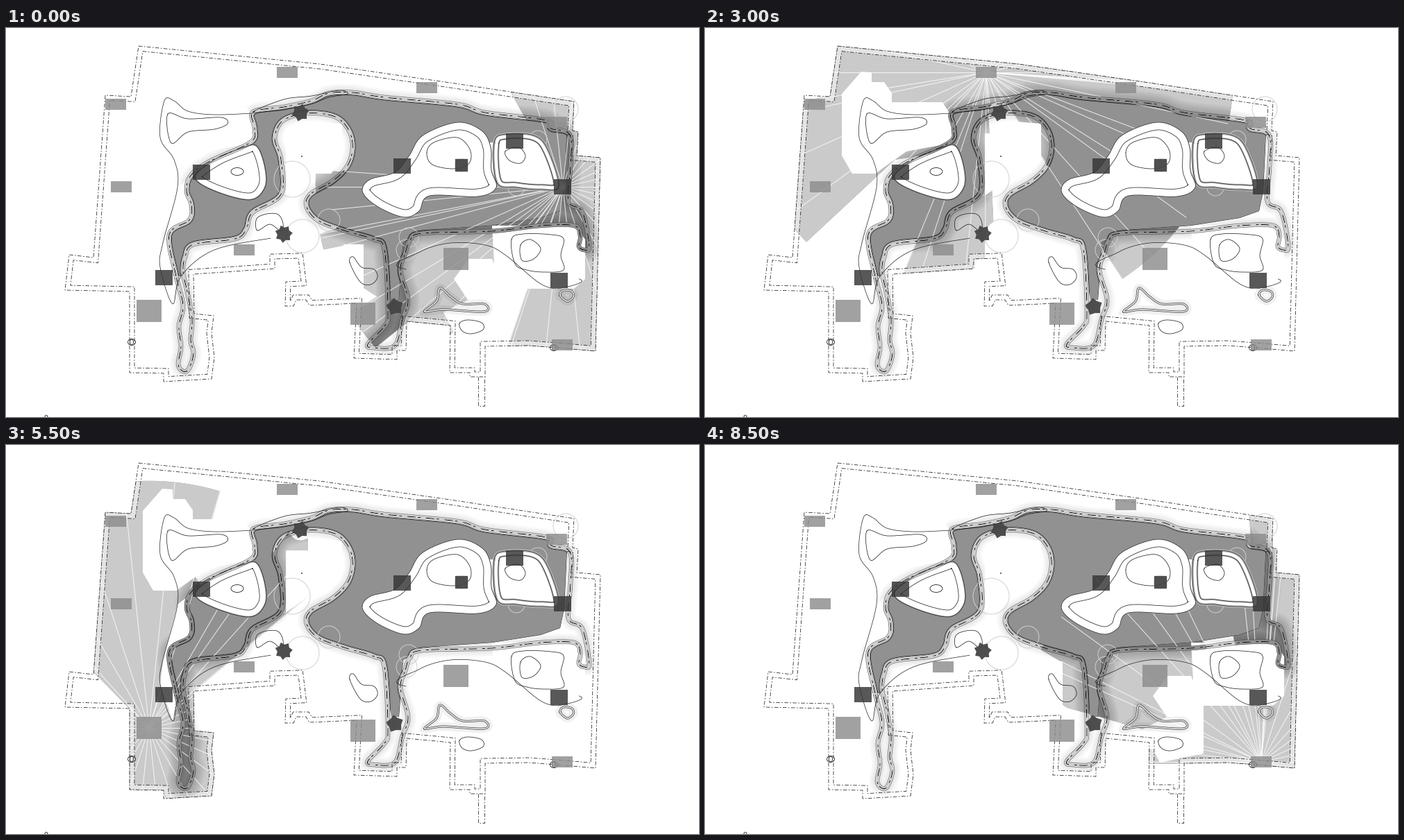
Animation of 998x561 px, one loop 9 s. Source, as a matplotlib script:

```python
import numpy as np
import matplotlib.pyplot as plt
from matplotlib.animation import ArtistAnimation
from matplotlib.collections import LineCollection
from matplotlib.patches import Circle, Ellipse, PathPatch, Polygon, Rectangle
from matplotlib.path import Path

W, H, PX = 998, 561, 0.72
RANGE = 356            # how far a visitor can see
BLACK, GREY = "#222222", "#919191"

fig = plt.figure(figsize=(W / 100, H / 100), dpi=100, facecolor="white")
ax = fig.add_axes([0, 0, 1, 1])
ax.set_xlim(0, W)
ax.set_ylim(H, 0)
ax.axis("off")


def pts(*flat):
    return np.array(flat, float).reshape(-1, 2)


def smooth(*flat, n=8):
    """Closed Catmull-Rom curve through the points."""
    b = pts(*flat)
    a, c, d = (np.roll(b, k, axis=0)[:, None] for k in (1, -1, -2))
    b = b[:, None]
    t = np.linspace(0, 1, n, endpoint=False)[None, :, None]
    curve = 0.5 * (2 * b + (c - a) * t + (2 * a - 5 * b + 4 * c - d) * t**2
                   + (3 * b - a - 3 * c + d) * t**3)
    return curve.reshape(-1, 2)


def inset(p, d):
    """Outline moved inwards by d with mitred corners."""
    nxt = np.roll(p, -1, axis=0)
    e = nxt - p
    e /= np.hypot(*e.T)[:, None]
    area = np.sum(p[:, 0] * nxt[:, 1] - nxt[:, 0] * p[:, 1])
    normal = np.sign(area) * np.c_[-e[:, 1], e[:, 0]]
    before = np.roll(normal, 1, axis=0)
    scale = np.maximum(1 + np.sum(normal * before, axis=1), 0.5)
    return p + d * (normal + before) / scale[:, None]


def ring(x, y, r, n=24):
    a = np.linspace(0, 2 * np.pi, n, endpoint=False)
    return np.c_[x + r * np.cos(a), y + r * np.sin(a)]


def fill(p, color, z, alpha=1):
    return ax.add_patch(Polygon(p, fc=color, ec="none", zorder=z, alpha=alpha))


def stroke(p, width, z, color=BLACK, style="-", alpha=1, closed=True):
    if closed:
        p = np.vstack([p, p[:1]])
    return ax.plot(p[:, 0], p[:, 1], color=color, lw=width * PX, ls=style, zorder=z,
                   alpha=alpha, solid_joinstyle="round", dash_capstyle="butt")[0]


# Building
outer = pts(191, 26, 452, 52, 640, 79, 818, 106, 816, 148, 824, 150, 822, 184, 856, 187,
            849, 466, 793, 461, 752, 458, 690, 459, 690, 503, 668, 503, 668, 497, 639, 497,
            640, 429, 577, 423, 576, 465, 563, 465, 563, 478, 501, 476, 505, 397, 437, 400,
            432, 392, 418, 392, 414, 401, 402, 401, 403, 366, 425, 365, 421, 332, 387, 333,
            387, 347, 270, 355, 271, 412, 299, 415, 296, 440, 300, 475, 296, 506, 227, 510,
            227, 498, 178, 497, 178, 380, 85, 378, 91, 327, 126, 331, 143, 97, 180, 99)
inner = inset(outer, 7)
for wall in (outer, inner):
    stroke(wall, 0.8, 12, BLACK, (0, (7, 3, 2, 3)))
stroke(pts(680, 503, 680, 545, 689, 545, 689, 503), 0.8, 12, BLACK, (0, (7, 3, 2, 3)), closed=False)

# Pool bank with its three tails, walked clockwise
north = (245, 358, 235, 298, 264, 277, 267, 255, 260, 235, 266, 213, 292, 193, 352, 165,
         358, 145, 356, 121, 400, 114, 440, 105, 465, 94, 500, 93, 545, 100, 650, 110,
         690, 122, 778, 133, 785, 145, 812, 154, 813, 200, 810, 250, 830, 265, 840, 315,
         833, 320, 825, 315, 827, 300, 818, 285, 770, 285, 700, 293, 600, 296, 582, 306)
south = (575, 325, 568, 350, 579, 392, 571, 420, 560, 458, 530, 461, 521, 456, 545, 430,
         550, 410, 545, 320, 530, 305, 490, 293, 450, 278, 433, 258, 438, 240, 470, 221,
         491, 200, 499, 175, 495, 150, 478, 130, 450, 123, 420, 125, 396, 136, 387, 160,
         396, 190, 396, 240, 355, 266, 346, 290, 330, 304, 270, 312, 258, 330, 255, 352)
tail = (261, 380, 268, 420, 266, 450, 270, 470, 263, 492, 255, 495, 248, 485, 252, 460,
        249, 430, 255, 400)
shore = smooth(*north, *south, *tail)
water = inset(shore, 4)
wet = Path(pts(200, 80, 808, 80, 808, 150, 804, 235, 798, 264, 770, 274, 700, 285, 600, 292,
               572, 310, 566, 392, 555, 392, 545, 330, 300, 320, 262, 358, 200, 358))
for art in (fill(water, GREY, 6), stroke(water, 0.8, 6.1),
            stroke(wet.vertices[2:10], 0.8, 6.1, closed=False)):
    art.set_clip_path(wet, ax.transData)
for width in range(9, 26, 3):
    stroke(shore, width, 1, "black", alpha=0.016)
for width, color in ((6.4, "#555555"), (5, "white"), (2.6, "#666666"), (1.4, "white")):
    stroke(shore, width, 9, color)
stroke(shore, 0.9, 9.1, BLACK, (0, (13, 4, 4, 9)))

# Islands and hills
isle = smooth(513, 232, 525, 218, 560, 208, 580, 185, 600, 155, 650, 136, 685, 148, 698, 172,
              699, 205, 706, 230, 680, 243, 610, 242, 595, 264, 575, 273, 545, 263, 521, 247)
terrace = smooth(703, 165, 720, 153, 760, 155, 780, 175, 796, 228, 770, 233, 735, 230, 707, 223)
terrace_top = inset(terrace, 7)
hill = smooth(272, 215, 300, 190, 340, 173, 361, 170, 373, 200, 373, 230, 351, 248, 300, 235)
summit = smooth(606, 180, 616, 165, 650, 158, 668, 175, 667, 195, 645, 203, 614, 197)
east_top = smooth(741, 313, 755, 305, 770, 318, 760, 333, 743, 335)
pond = smooth(653, 426, 665, 421, 685, 425, 687, 435, 670, 441, 657, 437)
for shape, edge, width in ((isle, "#cccccc", 1), (terrace, "#bbbbbb", 3.5), (hill, "#999999", 2.5)):
    fill(shape, "white", 8)
    stroke(shape, width, 8.2, edge)
fill(pts(692, 165, 708, 165, 708, 225, 694, 230), "white", 8.1)
stroke(terrace_top, 2.5, 8.2, "#bbbbbb")

contours = [
    isle, inset(isle, 11), terrace, terrace_top, hill, inset(hill, 10), summit, east_top, pond,
    smooth(719, 178, 738, 172, 748, 184, 741, 195, 725, 191),
    smooth(233, 124, 262, 131, 310, 129, 319, 138, 300, 146, 262, 150, 238, 166),
    smooth(728, 305, 745, 297, 785, 298, 803, 304, 799, 328, 803, 349, 775, 352, 750, 349, 733, 340),
    smooth(495, 338, 500, 330, 512, 345, 530, 348, 535, 360, 525, 370, 510, 366),
    smooth(362, 292, 361, 275, 376, 268, 392, 269, 399, 282, 396, 293, 380, 283),
    smooth(356, 122, 400, 103, 440, 98, 480, 90, 492, 95, 465, 100, 430, 112)]
for p in contours:
    stroke(p, 0.75, 11)
rim = smooth(355, 123, 300, 125, 262, 120, 242, 105, 228, 105, 222, 158, 242, 190, 247, 230,
             226, 310, 222, 345, 240, 398, 252, 358, 300, 320, 388, 302, 388, 302, 355, 123)
stroke(rim[:-24], 0.7, 11, closed=False)
lawn = smooth(576, 348, 596, 323, 640, 310, 690, 313, 720, 328, 770, 369, 800, 375, 815, 360)
stroke(lawn[:-8], 0.7, 11, closed=False)
for p in (smooth(603, 409, 620, 394, 625, 375, 641, 388, 658, 398, 689, 398, 689, 409, 630, 406),
          smooth(798, 385, 803, 378, 815, 380, 817, 388, 808, 394)):
    stroke(p, 12, 4.6, "black", alpha=0.06)
    stroke(p, 3.2, 11, "#444444")
    stroke(p, 1.8, 11, "#dddddd")
for x, y, w, h in ((333, 207, 18, 11), (181, 453, 11, 9), (789, 461, 11, 9), (181, 453, 5, 8),
                   (789, 461, 5, 8), (58, 560, 4, 3), (426, 185, 1, 1)):
    ax.add_patch(Ellipse((x, y), w, h, fill=False, ec=BLACK, lw=0.6, zorder=11))
for x, y, r in ((806, 117, 18), (766, 161, 13), (735, 230, 12), (427, 300, 24), (465, 277, 16),
                (580, 302, 14), (577, 320, 15), (412, 218, 26)):
    ax.add_patch(Circle((x, y), r, fill=False, ec="#d0d0d0", lw=0.7, zorder=7.5))

# Ground that is never seen into
thicket = pts(470, 358, 486, 330, 486, 312, 515, 312, 515, 375, 535, 388, 486, 388)
masks = [
    thicket,
    pts(197, 95, 225, 63, 240, 64, 240, 78, 258, 78, 269, 94, 269, 107, 342, 107, 360, 135,
        355, 166, 290, 178, 245, 210, 212, 210, 197, 184),
    pts(403, 152, 435, 152, 435, 134, 484, 138, 484, 190, 468, 210, 447, 210, 403, 242),
    pts(645, 362, 666, 333, 700, 333, 718, 375, 718, 445, 655, 458, 630, 410, 665, 392),
    pts(700, 285, 820, 285, 834, 305, 834, 362, 818, 376, 705, 376),
    pts(270, 212, 247, 230, 226, 310, 222, 345, 240, 398, 246, 360, 235, 298, 264, 277)]
for p in masks:
    fill(p, "white", 4)

# Things that stop the eye
blockers = [summit, terrace_top, east_top, pond, thicket, pts(272, 190, 335, 180, 345, 210, 300, 230),
            ring(465, 277, 16), ring(427, 300, 24), ring(424, 122, 16)]

# Viewpoints in walking order; the last two are only marked
stops = [(802, 229, "dark"), (733, 163, "dark"), (571, 199, "dark"), (656, 198, 4),
         (606, 86, "light"), (424, 122, 6), (405, 64, "light"), (282, 208, "dark"),
         (158, 110, "light"), (166, 229, "light"), (228, 360, "dark"), (206, 408, "big"),
         (400, 297, 7), (514, 412, "big"), (560, 402, 5), (648, 333, "big"),
         (797, 364, "dark"), (801, 457, "light"), (793, 136, "light"), (343, 320, "light")]
looks = {"dark": (25, 22, "#333333"), "light": (30, 16, "#8c8c8c"), "big": (36, 32, "#8c8c8c")}
for x, y, kind in stops:
    if kind in looks:
        w, h, color = looks[kind]
        ax.add_patch(Rectangle((x - w / 2, y - h / 2), w, h, fc=color, alpha=0.82, zorder=14))
    else:
        star = ring(0, 0, 13, 2 * kind) @ np.array([[0.7, 0.7], [-0.7, 0.7]])
        star[1::2] *= 0.72
        fill(star + (x, y), "#444444", 14, 0.95)


def look(eye, count=1080):
    """Outline of everything seen from a point, and the sight lines to draw."""
    a = np.linspace(0, 2 * np.pi, count, endpoint=False)
    d = np.c_[np.cos(a), np.sin(a)]
    reach = np.full(count, float(RANGE))
    for shape in [outer] + blockers:
        p = shape - eye
        inside = Path(shape).contains_point(eye) or np.hypot(*p.T).min() < 8
        if shape is not outer and inside:
            continue
        e = np.roll(p, -1, axis=0) - p
        den = d[:, :1] * e[:, 1] - d[:, 1:] * e[:, 0]
        den = np.where(abs(den) < 1e-9, 1e-9, den)
        t = (p[:, 0] * e[:, 1] - p[:, 1] * e[:, 0]) / den
        u = (p[:, 0] * d[:, 1:] - p[:, 1] * d[:, :1]) / den
        hit = (t > 0.5) & (u >= 0) & (u <= 1)
        reach = np.minimum(reach, np.where(hit, t, RANGE).min(axis=1))
    edge = eye + d * reach[:, None]
    jump = abs(np.diff(reach, append=reach[0])) > 15
    even = np.arange(count) % (count // 30) == 0
    return edge, edge[jump | even]


def view(x, y):
    eye = np.array([x, y], float)
    edge, ends = look(eye)
    seen = Path(np.vstack([edge, edge[:1]]), closed=True)
    base = ax.add_patch(PathPatch(seen, fc="#e4e4e4", ec="#999999", lw=0.4, zorder=2))
    clipped = [fill(inner, "#cacaca", 3), fill(shore, "black", 3.5, 0.3),
               stroke(shore, 6, 10, "black", alpha=0.3)]
    clipped += [stroke(shore, w, 3.2, "black", alpha=0.028) for w in range(10, 35, 4)]
    for art in clipped:
        art.set_clip_path(seen, ax.transData)
    rays = LineCollection([(eye, end) for end in ends], colors="white", lw=1.1 * PX,
                          alpha=0.75, zorder=7)
    return [base, *clipped, ax.add_collection(rays)]


anim = ArtistAnimation(fig, [view(x, y) for x, y, _ in stops[:18]], interval=500,
                       repeat=True, repeat_delay=0)
plt.show()
```
